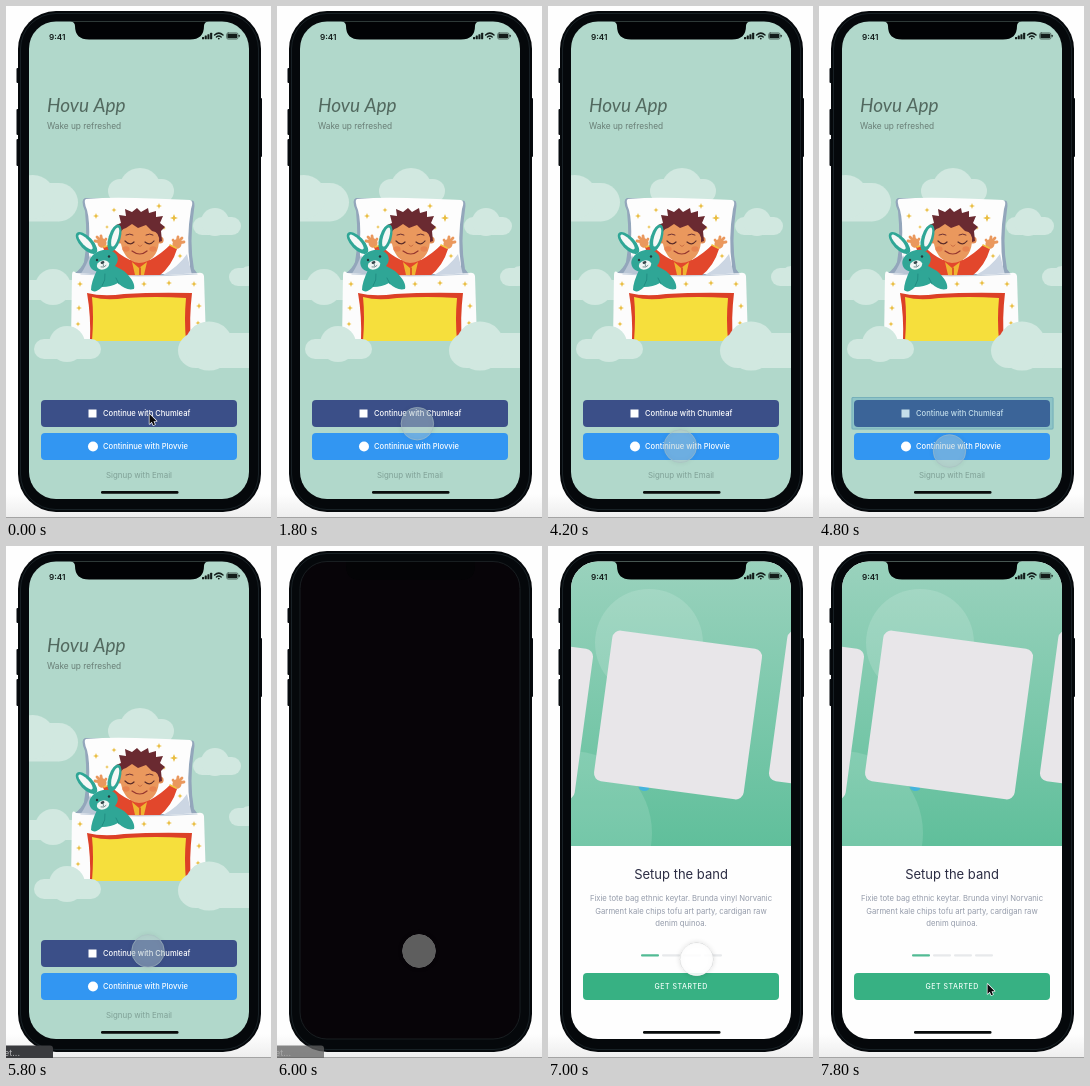
These frames come from a looping animation (265x512 px, 8 s). An HTML page with a canvas:

```html
<!DOCTYPE html>
<html lang="en">
<head>
<meta charset="utf-8">
<title>Bedtime app prototype</title>
<style>
  html, body { margin: 0; width: 100%; height: 100%; overflow: hidden; background: #fefefe; }
  canvas { display: block; width: 265px; height: 512px; }
</style>
</head>
<body>
<canvas id="stage"></canvas>
<script>
const W = 265, H = 512, LOOP = 8000, STEP = 200;
const SANS = 'Inter, "Open Sans", sans-serif';
const canvas = document.getElementById('stage');
const ratio = window.devicePixelRatio || 1;
canvas.width = W * ratio;
canvas.height = H * ratio;
const c = canvas.getContext('2d');
c.scale(ratio, ratio);

// Shape helpers
function fill(d, color) {
  c.fillStyle = color;
  c.fill(new Path2D(d));
}
function line(d, color, width = 1) {
  c.strokeStyle = color;
  c.lineWidth = width;
  c.lineCap = c.lineJoin = 'round';
  c.stroke(new Path2D(d));
}
function box(x, y, w, h, r, color) {
  c.fillStyle = color;
  c.beginPath();
  c.roundRect(x, y, w, h, r);
  c.fill();
}
function frame(x, y, w, h, r, color, width) {
  c.strokeStyle = color;
  c.lineWidth = width;
  c.beginPath();
  c.roundRect(x, y, w, h, r);
  c.stroke();
}
function oval(x, y, rx, ry, color, deg = 0) {
  c.fillStyle = color;
  c.beginPath();
  c.ellipse(x, y, rx, ry, deg * Math.PI / 180, 0, Math.PI * 2);
  c.fill();
}
const disc = (x, y, r, color) => oval(x, y, r, r, color);
function text(s, x, y, font, color, align = 'left', spacing = 0) {
  c.font = font;
  c.fillStyle = color;
  c.textAlign = align;
  c.letterSpacing = spacing + 'px';
  c.fillText(s, x, y);
}
function star(x, y, r = 3) {
  const q = r * 0.28;
  fill(`M${x} ${y - r}L${x + q} ${y - q}L${x + r} ${y}L${x + q} ${y + q}L${x} ${y + r}` +
       `L${x - q} ${y + q}L${x - r} ${y}L${x - q} ${y - q}Z`, '#e9bd3f');
}
function cloud(x, y, w, h, puffX, puffY, puffR) {
  const color = '#d1e8e0';
  box(x, y, w, h, h / 2, color);
  disc(puffX, puffY, puffR, color);
}

function backdrop() {
  c.fillStyle = '#fefefe';
  c.fillRect(0, 0, W, H);
  const g = c.createLinearGradient(0, 488, 0, 511);
  g.addColorStop(0, '#fefefe');
  g.addColorStop(1, '#eeeeee');
  c.fillStyle = g;
  c.fillRect(0, 488, W, 23);
  c.fillStyle = '#a4a4a4';
  c.fillRect(0, 511, W, 1);
}

function phone() {
  for (const [x, y, h] of [[10.5, 62, 15], [10.5, 103, 26], [10.5, 133, 27], [252, 92, 59]]) {
    box(x, y, 4, h, 1, '#070b0f');
  }
  box(12, 5, 243, 501, 38, '#05080b');
  frame(14.5, 7.5, 238, 496, 35.5, '#1d282d', 0.8);
}

function notchAndStatus() {
  fill('M64 15H203Q198 16 198 20Q198 33.5 184 33.5H83Q69 33.5 69 20Q69 16 64 15Z', '#020305');
  const ink = '#131c1a';
  text('9:41', 43, 33.5, `600 8.2px ${SANS}`, ink);
  for (let i = 0; i < 4; i++) box(196 + i * 2.7, 31 - i * 1.4, 2.1, 2.2 + i * 1.4, 0.5, ink);
  line('M208.6 29Q212.8 25.3 217 29', ink, 1.5);
  line('M210.4 31Q212.8 29 215.2 31', ink, 1.4);
  disc(212.8, 32.6, 0.9, ink);
  frame(220.6, 26.9, 11.4, 6.2, 1.6, '#3c4b46', 0.7);
  box(221.4, 27.7, 9.8, 4.6, 0.8, ink);
  box(232.7, 28.8, 0.9, 2.4, 0.4, ink);
}

function pillow() {
  fill('M79 192Q74 194 79 205Q82 235 78 256Q75 263 69 267V271H194L188 263Q183 236 188 204Q190 192 184 195Z', '#93a6bb');
  fill('M80 193Q104 191 130 192Q162 193 184 194Q188 195 185 203Q180 233 184 260L178 268H86Q82 255 83 235Q84 215 81 204Q77 194 80 193Z', '#fdfdfd');
  fill('M157 269Q172 261 181 248L186 269Z', '#ccd6e3');
  fill('M74 269Q81 259 84 249Q88 262 99 269Z', '#b9c6d5');
  for (const [x, y, r] of [[90, 210, 3], [108, 204, 2.5], [153, 200, 3], [168, 212, 4],
    [101, 221, 2], [158, 222, 2], [174, 250, 2.5], [160, 253, 3]]) star(x, y, r);
}

const SKIN = '#ea985d';

function hand(x, y, side) {
  c.save();
  c.translate(x, y);
  c.scale(side, 1);
  line('M0 0L-7 -1M0 0L-5 -5M0 0L-1 -6M1 1L4 -3', SKIN, 2.8);
  oval(0, 1, 4.5, 4.8, SKIN, -25);
  c.restore();
}

function boy() {
  hand(96, 236, 1);
  hand(171, 237, -1);
  fill('M97 241L104 239Q113 249 124 254H144Q155 248 164 239L171 243Q166 260 153 270H112Q101 257 97 241Z', '#e2472c');
  line('M98 241L104 239M164 239L170 242', '#f2c13a', 1.6);
  fill('M126 256L133 262L141 256L138 269H129Z', '#f0b432');
  line('M134 262V269', '#d83c25', 1.5);
  disc(114, 234, 3.6, '#df8850');
  disc(154, 234, 3.6, '#df8850');
  fill('M112 232L113 224L110 219L115 217L113 209L120 210L119 203L126 206L131 202L135 206' +
       'L142 202L143 207L150 205L150 211L157 210L154 217L159 221L155 225L156 235L150 237Z', '#6a2a31');
  fill('M114 231Q114 223 120 222L126 218L132 222L140 219L146 225Q154 226 153 236Q151 256 133 257Q116 255 114 231Z', SKIN);
  oval(120, 243, 3.6, 2.8, '#e78450');
  oval(147, 243, 3.6, 2.8, '#e78450');
  line('M119 235Q124 240 128 236M139 236Q144 240 148 235', '#592b28', 1.2);
  line('M120 229Q124 227 127 229M140 229Q144 227 147 229', '#6c3033', 1);
  line('M132 239Q134 242 136 239', '#cc7045', 1);
  line('M126 245Q134 251 141 245', '#963830', 1.2);
}

function blanket() {
  fill('M70 267Q66 263 66 270L65 335H200L198 270Q197 266 192 267Q133 272 70 267Z', '#fcfcfc');
  line('M75 268Q132 272 191 268', '#c7d2df', 1.2);
  for (const [x, y, r] of [[74, 278, 3], [138, 278, 3], [163, 277, 3], [188, 278, 3],
    [73, 302, 3], [72, 318, 2.5], [193, 300, 3], [192, 317, 2.5]]) star(x, y, r);
  fill('M81 287Q97 291 118 288Q150 286 186 287Q183 312 185 335H84Q85 310 81 287Z', '#dc4027');
  fill('M86 291Q100 295 120 292Q150 290 180 292Q178 313 180 335H86Q88 310 86 291Z', '#f6df3c');
}

function rabbit() {
  const teal = '#2fa696', dark = '#208b80';
  oval(80.5, 237, 14, 6.3, teal, 46);
  oval(108.5, 232, 14, 6, teal, -73);
  oval(79.5, 236, 9.8, 3.2, '#f5f8f7', 46);
  oval(109.2, 231, 10, 3, '#f5f8f7', -73);
  fill('M92 262Q85 276 85 284Q89 288 96 281Q105 281 112 277Q120 285 128 283Q130 276 118 265L109 260Z', teal);
  line('M96 280Q100 274 99 268M113 278L110 272', dark, 0.9);
  oval(97.5, 255, 14.5, 10.8, teal, -17);
  oval(97, 259, 6.3, 4.5, '#eff6f4', -17);
  disc(91, 254, 1.2, '#24383a');
  disc(103, 250.5, 1.2, '#24383a');
  oval(96.5, 256.5, 2, 1.3, '#344448', -17);
  line('M97 257L97.5 260M95 261Q98 262 100 259.5', '#456066', 0.7);
}

function button(y, color, label) {
  box(35, y, 196, 27, 4, color);
  text(label, 97, y + 16, `500 7.6px ${SANS}`, '#ffffff');
}

function welcome(hint) {
  c.fillStyle = '#b1d8cb';
  c.fillRect(23, 14, 220, 480);
  text('Hovu App', 41, 106, 'italic 400 19px Lato, cursive', '#52695f');
  text('Wake up refreshed', 41, 122.6, `400 8.3px ${SANS}`, '#687d75');

  cloud(0, 177, 72, 38.5, 27, 191, 22);
  cloud(102, 173, 66, 24, 134, 183, 21);
  cloud(187, 211, 48, 18, 209, 216, 14);
  cloud(4, 274, 78, 20, 47, 281, 18);
  cloud(223, 262, 45, 18, 243, 270, 10);
  pillow();
  boy();
  blanket();
  rabbit();
  cloud(28, 333, 67, 20, 61, 338, 18);
  cloud(172, 327, 88, 35, 203, 340, 24.5);

  button(394, '#3b4f88', 'Continue with Chumleaf');
  button(427, '#3296f2', 'Contininue with Plovvie');
  box(82.5, 403.5, 8, 8, 0, '#ffffff');
  disc(87, 440.5, 5, '#ffffff');
  text('Signup with Email', 133, 472.4, `400 7.9px ${SANS}`, '#7fa096', 'center');
  if (hint) {
    box(32.5, 391, 202, 32.5, 1, 'rgba(60,150,190,.3)');
    frame(33, 391.5, 201, 31.5, 1, '#72adb8', 0.8);
  }
}

function card(x, y) {
  c.save();
  c.translate(x, y);
  c.rotate(7.7 * Math.PI / 180);
  box(-75.5, -76, 151, 152, 8, '#e8e6e9');
  c.restore();
}

function intro() {
  c.fillStyle = '#fefefe';
  c.fillRect(23, 14, 220, 480);
  c.save();
  c.beginPath();
  c.rect(23, 14, 220, 286);
  c.clip();
  const g = c.createLinearGradient(0, 14, 0, 300);
  g.addColorStop(0, '#9ad2bd');
  g.addColorStop(1, '#60bf9b');
  c.fillStyle = g;
  c.fillRect(23, 14, 220, 286);
  disc(101, 97, 54, 'rgba(255,255,255,.14)');
  disc(22, 287, 82, 'rgba(255,255,255,.13)');
  oval(96, 242, 5, 3, '#45b4dc', 8);
  card(-39, 169);
  card(130, 169);
  card(305, 169);
  c.restore();

  text('Setup the band', 133, 332.5, `400 13px ${SANS}`, '#2b2c43', 'center');
  ['Fixie tote bag ethnic keytar. Brunda vinyl Norvanic',
   'Garment kale chips tofu art party, cardigan raw',
   'denim quinoa.'].forEach((s, i) =>
    text(s, 133, 355.3 + i * 12.5, `400 7.7px ${SANS}`, '#949baa', 'center'));
  for (let i = 0; i < 4; i++) box(93 + i * 21, 408.3, 18, 2.2, 1, i ? '#e7e9eb' : '#52bb94');
  box(35, 427, 196, 27, 4, '#37b183');
  text('GET STARTED', 133.2, 443, `500 7px ${SANS}`, '#f5fffb', 'center', 0.5);
}

// Pointer positions: time, x, y
const path = [[0, 143.5, 408], [1000, 143.5, 408], [2400, 138, 425], [3400, 136, 430.5],
  [4600, 130.5, 445], [4800, 130.5, 445], [5400, 142, 405], [6800, 142, 405],
  [7600, 168.5, 438], [LOOP, 168.5, 438]];

function pointerAt(t) {
  const i = path.findIndex(p => p[0] > t);
  const [t0, x0, y0] = path[i - 1], [t1, x1, y1] = path[i];
  const k = (t - t0) / (t1 - t0);
  return [x0 + (x1 - x0) * k, y0 + (y1 - y0) * k];
}

function arrow(x, y) {
  c.save();
  c.translate(x, y);
  c.scale(0.86, 0.86);
  const d = 'M0 0V11.5L2.7 9L4.4 13L6.4 12.1L4.7 8.3H8.3Z';
  line(d, '#ffffff', 1.6);
  fill(d, '#0a0a0c');
  c.restore();
}

function touch(x, y, inside, edge) {
  c.save();
  c.shadowColor = 'rgba(0,0,0,.35)';
  c.shadowBlur = 4 * ratio;
  c.lineWidth = 1;
  c.strokeStyle = edge;
  c.beginPath();
  c.arc(x, y, 16.3, 0, Math.PI * 2);
  c.stroke();
  c.restore();
  disc(x, y, 16.5, inside);
}

function pointer(t) {
  const [x, y] = pointerAt(t);
  if (t < 1600 || t >= 7200) arrow(x, y);
  else if (t < 6000) touch(x, y, 'rgba(180,203,205,.45)', 'rgba(160,180,185,.5)');
  else if (t < 6200) touch(x, y, '#5e5e5e', '#777777');
  else touch(x, y, 'rgba(255,255,255,.88)', '#c4c6c7');
}

function linkBar(t) {
  if (t < 5600 || t >= 6200) return;
  const fading = t >= 6000;
  box(-4, 499.5, 51, 16, 3, fading ? 'rgba(95,95,95,.75)' : '#3a3b3e');
  text('et...', -2, 510, `400 9px ${SANS}`, fading ? '#a9a9a9' : '#b4b4b6');
}

function draw(t) {
  const dark = t >= 6000 && t < 6200;
  backdrop();
  phone();
  c.save();
  c.beginPath();
  c.roundRect(23, 15.5, 220, 477.5, 27);
  c.clip();
  if (dark) {
    c.fillStyle = '#070408';
    c.fillRect(23, 14, 220, 480);
    fill('M69 14H198V20Q198 34 184 34H83Q69 34 69 20Z', '#040406');
  } else {
    if (t < 6000) welcome(t >= 4600 && t < 5200);
    else intro();
    notchAndStatus();
    box(95, 485, 77.5, 2.7, 1.3, '#080b0b');
  }
  c.restore();
  if (dark) frame(23, 15.5, 220, 477.5, 27, '#22292c', 0.7);
  linkBar(t);
  pointer(t);
}

function tick() {
  const t = performance.now() % LOOP;
  draw(Math.floor(t / STEP) * STEP);
  requestAnimationFrame(tick);
}
tick();
</script>
</body>
</html>
```
